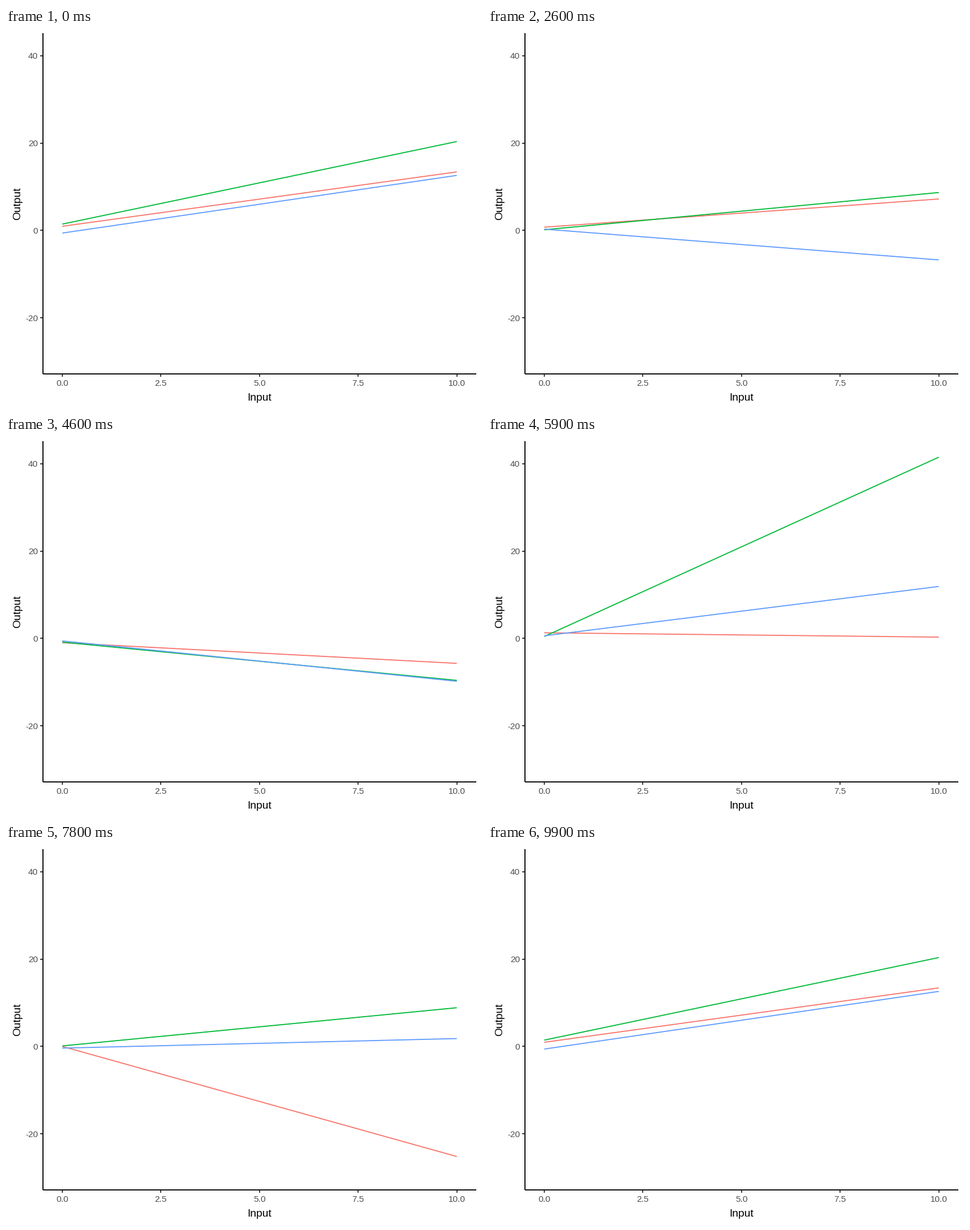
These frames come from a looping animation (837x669 px, 10 s). A matplotlib script:

```python
import matplotlib.pyplot as plt
from matplotlib.animation import FuncAnimation

W, H, DPI = 837, 669, 100
PT = 72 / DPI                      # points per pixel
LINE = 1.87 * PT
COLORS = ("#F8766D", "#00BA38", "#619CFF")

# Output at input 0 and input 10 for the red, green and blue line of each state
STATES = [
    ((0.95, 13.4), (1.45, 20.35), (-0.6, 12.6)),
    ((1.75, 33.6), (1.09, 12.27), (-1.39, -14.92)),
    ((0.75, 10.85), (0.15, 16.9), (0.3, -9.06)),
    ((0.75, -7.4), (0.15, -24.2), (0.3, 2.5)),
    ((-1.14, -9.58), (-1.0, -6.81), (-0.67, -11.53)),
    ((-0.29, 9.8), (-0.25, -20.75), (-0.17, -2.9)),
    ((1.3, 0.3), (0.45, 41.5), (0.6, 11.9)),
    ((0.0, -11.8), (0.04, -15.3), (-0.11, 0.8)),
    ((0.0, -28.55), (0.14, 14.9), (-0.45, 2.05)),
    ((0.0, 3.4), (0.0, -4.4), (0.0, -29.3)),
]
STARTS = (6, 16, 26, 36, 46, 55, 65, 75, 85, 95)
STEPS = 5
FRAMES = 100


def px(value):
    return 99 + 69.37 * value


def py(value):
    return 356.4 - 7.69 * value


plt.rcParams["font.family"] = "Liberation Sans"
plt.rcParams["axes.unicode_minus"] = False
# The small surplus keeps the pixel size from rounding down
fig = plt.figure(figsize=((W + 0.01) / DPI, (H + 0.01) / DPI), dpi=DPI,
                 facecolor="white")
ax = fig.add_axes([0, 0, 1, 1])
ax.set_xlim(0, W)
ax.set_ylim(H, 0)
ax.axis("off")


def stroke(xs, ys, color):
    return ax.plot(xs, ys, color=color, lw=LINE, solid_capstyle="butt")[0]


def label(x, y, text, size, color, **kw):
    ax.text(x, y, text, fontsize=size * PT, color=color, va="baseline", **kw)


lines = [stroke([px(0), px(10)], [0, 0], c) for c in COLORS]

LEFT, TOP, RIGHT, BOTTOM = 64.5, 9.5, 827.3, 609
stroke([LEFT, LEFT], [TOP, BOTTOM], "black")
stroke([LEFT, RIGHT], [BOTTOM, BOTTOM], "black")

for v in (0, 2.5, 5, 7.5, 10):
    stroke([px(v)] * 2, [BOTTOM + 1, BOTTOM + 5], "#333333")
    label(px(v), 630, f"{v:.1f}", 15.4, "#4D4D4D", ha="center")
for v in (-20, 0, 20, 40):
    stroke([LEFT - 5, LEFT - 1], [py(v)] * 2, "#333333")
    label(56, py(v) + 5.6, str(v), 15.4, "#4D4D4D", ha="right")

label(445.7, 656, "Input", 19.3, "black", ha="center")
label(25, 309.5, "Output", 19.3, "black", ha="center",
      rotation=90, rotation_mode="anchor")


def pose(frame):
    """Return the current state, the next one and the progress between them."""
    index = sum(frame >= s for s in STARTS)
    if index == 0:
        return STATES[0], STATES[0], 0
    progress = min(1, (frame - STARTS[index - 1] + 1) / STEPS)
    return STATES[index - 1], STATES[index % len(STATES)], progress


def update(frame):
    before, after, t = pose(frame)
    for line, a, b in zip(lines, before, after):
        line.set_ydata([py(p + (q - p) * t) for p, q in zip(a, b)])
    return lines


anim = FuncAnimation(fig, update, frames=FRAMES, interval=100,
                     repeat=True, repeat_delay=0, blit=False)
plt.show()
```
